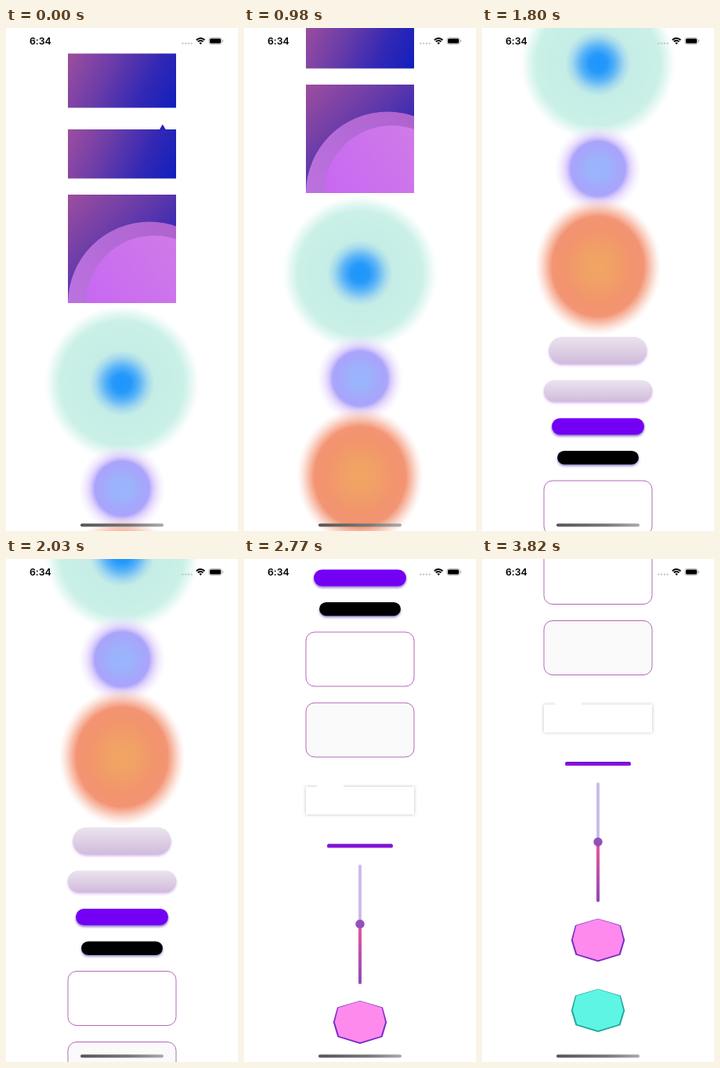
Write an HTML page that moves like this. It is 296x640 px and loops after 3920 ms.

```html
<!DOCTYPE html>
<html lang="en">
<head>
<meta charset="utf-8">
<title>Gradient gallery</title>
<style>
html, body { margin: 0; width: 100%; height: 100%; overflow: hidden; background: #fff; }
svg { display: block; width: 100vw; height: 100vh; }
text { font: 600 12.4px Inter, "Liberation Sans", sans-serif; letter-spacing: -.1px; }
</style>
</head>
<body>
<svg viewBox="0 0 296 640" xmlns="http://www.w3.org/2000/svg">
  <defs id="defs"></defs>
  <g id="page"></g>
  <g id="chrome">
    <text x="30" y="21.2">6:34</text>
    <g fill="#c4c4c4">
      <circle cx="225.4" cy="19.6" r="1.2"/><circle cx="229.2" cy="19.6" r="1.2"/>
      <circle cx="233" cy="19.6" r="1.2"/><circle cx="236.8" cy="19.6" r="1.2"/>
    </g>
    <g fill="none" stroke="#000" stroke-width="1.9">
      <path d="M242.9 15.2Q248.2 10.6 253.5 15.2"/>
      <path d="M244.8 17.4Q248.2 14.5 251.6 17.4"/>
    </g>
    <path d="M248.2 20.9L246.4 18.9Q248.2 17.5 250 18.9Z"/>
    <rect x="258.9" y="12.5" width="16.4" height="8" rx="2.4" fill="none" stroke="#a8a8a8" stroke-width=".8"/>
    <rect x="260" y="13.5" width="14.2" height="6" rx="1.5"/>
    <path d="M276.3 15q1.1 .4 1.1 1.5t-1.1 1.5z" fill="#a8a8a8"/>
    <rect x="95" y="630.6" width="106" height="3.9" rx="1.95" fill="url(#home)"/>
  </g>
</svg>
<script>
const defs = document.getElementById('defs');
const page = document.getElementById('page');

const stops = list => list.map(([o, c, a = 1]) =>
  `<stop offset="${o}" stop-color="${c}" stop-opacity="${a}"/>`).join('');
const linear = (id, x1, y1, x2, y2, list) =>
  `<linearGradient id="${id}" gradientUnits="userSpaceOnUse" x1="${x1}" y1="${y1}" x2="${x2}" y2="${y2}">${stops(list)}</linearGradient>`;
const vertical = (id, list) =>
  `<linearGradient id="${id}" x2="0" y2="1">${stops(list)}</linearGradient>`;
const radial = (id, list) => `<radialGradient id="${id}">${stops(list)}</radialGradient>`;
const shadow = (id, dy, blur, color, alpha) =>
  `<filter id="${id}" x="-20%" y="-60%" width="140%" height="240%"><feDropShadow dx="0" dy="${dy}" stdDeviation="${blur}" flood-color="${color}" flood-opacity="${alpha}"/></filter>`;

const rect = (x, y, w, h, fill, more = '') =>
  `<rect x="${x}" y="${y}" width="${w}" height="${h}" fill="${fill}" ${more}/>`;
const pill = (x, y, w, h, fill, filter) =>
  rect(x, y, w, h, fill, `rx="${h / 2}" filter="url(#${filter})"`);
const glow = (y, rx, ry, id) =>
  `<ellipse cx="148" cy="${y}" rx="${rx}" ry="${ry}" fill="url(#${id})"/>`;
const outline = (y, fill) =>
  rect(79, y, 138, 69, fill, 'rx="11" stroke="#b468b8" stroke-width="1"');

// Mirror the right half of an octagon around x = 148.
const octagon = (y, half, fill) => {
  const right = half.map(([x, dy]) => [148 + x, y + dy]);
  const left = half.slice(1, -1).reverse().map(([x, dy]) => [148 - x, y + dy]);
  return `<polygon points="${right.concat(left).join(' ')}" fill="${fill}"/>`;
};
const gem = (y, face, edge) =>
  octagon(y, [[0, 0], [29, 8.6], [34.2, 27.5], [28.6, 46.3], [0, 55]], edge) +
  octagon(y, [[0, .6], [27.8, 9], [32.2, 27.2], [26.8, 45], [0, 53]], face);

const dusk = [[0, '#9e4e9f'], [.35, '#6c3da8'], [.7, '#3328b4'], [1, '#101fbd']];

defs.innerHTML =
  linear('card1', 79, 32.5, 217, 101.5, dusk) +
  linear('card2', 79, 129, 217, 191.5, dusk) +
  linear('card3', 79, 212, 217, 350, dusk) +
  linear('ring', 79, 350, 217, 250, [[0, '#bb73df'], [1, '#ae62ce']]) +
  linear('disc', 103, 350, 217, 275, [[0, '#c868f3'], [1, '#cf7ae8']]) +
  linear('home', 95, 0, 201, 0, [[0, '#555'], [.6, '#777'], [1, '#aaa']]) +
  radial('mint', [[0, '#1c95fb'], [.12, '#2699fa'], [.22, '#58b2f7'], [.33, '#a2d8ee'],
    [.42, '#c5ede6'], [.8, '#caf0e7'], [.9, '#d4f3ec', .6], [1, '#e2f7f2', 0]]) +
  radial('violet', [[0, '#98b6fb'], [.25, '#9cb2fb'], [.48, '#a5a7fb'], [.62, '#aaa4fb'],
    [.72, '#d2c0fb', .8], [.83, '#e2d2fc', .5], [1, '#efe6fd', 0]]) +
  radial('coral', [[0, '#f0a663'], [.25, '#f1a066'], [.55, '#f2946e'], [.72, '#f39473'],
    [.83, '#f5a78d', .65], [.92, '#f8c4b2', .35], [1, '#fbe0d6', 0]]) +
  vertical('mist', [[0, '#ebe4ee'], [1, '#d0bbdb']]) +
  vertical('bar', [[0, '#6a10cf'], [1, '#9a18df']]) +
  vertical('track', [[0, '#ea579b'], [1, '#9048b8']]) +
  shadow('lilac', 2, 1.8, '#c08af0', .55) +
  shadow('indigo', 2, 1.6, '#4a28a8', .65) +
  shadow('slate', 2, 1.6, '#6a58b8', .65) +
  shadow('soft', 0, 2.2, '#000', .26) +
  '<clipPath id="crop"><rect x="79" y="212" width="138" height="138"/></clipPath>';

page.innerHTML =
  rect(79, 32.5, 138, 69, 'url(#card1)') +
  rect(79, 129, 138, 62.5, 'url(#card2)') +
  '<path d="M195.8 129.3L199.8 122.4L203.8 129.3Z" fill="#2822b5"/>' +
  rect(79, 212, 138, 138, 'url(#card3)') +
  '<g clip-path="url(#crop)"><circle cx="183" cy="350.5" r="104" fill="url(#ring)"/>' +
  '<circle cx="189" cy="350.5" r="86.5" fill="url(#disc)"/></g>' +
  glow(452, 99, 99, 'mint') +
  glow(586, 56, 56, 'violet') +
  glow(710.5, 81, 88, 'coral') +
  pill(85.2, 800, 125.4, 34.6, 'url(#mist)', 'lilac') +
  pill(78.8, 855, 138.6, 27.6, 'url(#mist)', 'lilac') +
  pill(89, 903.5, 118, 21, '#7300f5', 'indigo') +
  pill(96, 945, 104, 17.4, '#000', 'slate') +
  outline(983, '#fff') +
  outline(1073, '#fafafa') +
  rect(79, 1180, 138, 35, '#fff', 'filter="url(#soft)"') +
  rect(93, 1174, 34, 8, '#fff') +
  rect(106, 1252.6, 84, 5, 'url(#bar)', 'rx="2.2"') +
  rect(146.1, 1278.7, 3.8, 100, '#c9b9ea', 'rx="1.9"') +
  rect(146, 1354.5, 4, 76.5, 'url(#track)', 'rx="2"') +
  '<circle cx="148" cy="1354.5" r="5.7" fill="#9350b8"/>' +
  gem(1452, '#ff8aee', '#7a2cc4') +
  gem(1541.5, '#5ef5e5', '#22a99b');

const LOOP = 3920;
const ticks = [0, 620, 740, 860, 980, 1100, 1200, 1300, 1400, 1510, 1620, 1800, 1920, 2040, 2160,
  2270, 2370, 2470, 2570, 2670, 2770, 2950, 3060, 3170, 3270, 3370, 3490, 3600, 3710, 3820];
// Three flicks and a bounce: time, scroll, speed.
const path = [[540, 0, 0], [980, 140, .46], [1300, 300, .4], [1660, 395, 0], [1705, 395, 0],
  [1800, 407, .34], [2370, 736, .58], [2770, 890, 0], [2880, 890, 0], [3170, 943, .36],
  [3430, 1003, 0], [3820, 994.5, 0]];

function scrollAt(t) {
  if (t <= path[0][0]) return path[0][1];
  const i = path.findIndex(p => p[0] >= t);
  if (i < 0) return path[path.length - 1][1];
  const [t0, y0, v0] = path[i - 1], [t1, y1, v1] = path[i];
  const d = t1 - t0, u = (t - t0) / d, w = 1 - u;
  return y0 * w * w * (1 + 2 * u) + v0 * d * u * w * w +
    y1 * u * u * (3 - 2 * u) - v1 * d * u * u * w;
}

function draw(now) {
  const t = now % LOOP;
  const tick = ticks.filter(k => k <= t).pop() || 0;
  page.setAttribute('transform', `translate(0 ${-scrollAt(tick).toFixed(2)})`);
}

const start = performance.now();
function loop() {
  draw(performance.now() - start);
  requestAnimationFrame(loop);
}
loop();
</script>
</body>
</html>
```
